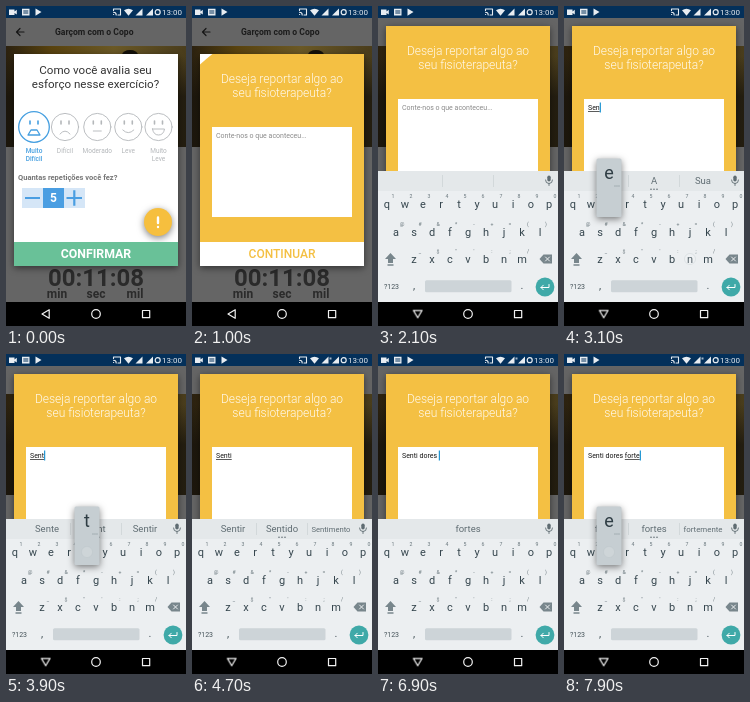
Write an HTML page that moves like this. It is 180x320 px and loops after 8 s.

```html
<!DOCTYPE html>
<html lang="pt-BR">
<head>
<meta charset="utf-8">
<title>Relato de exercício</title>
<style>
  html, body { margin: 0; width: 100%; height: 100%; overflow: hidden; background: #000; }
  svg { display: block; width: 100%; height: 100%; font-family: Roboto, sans-serif; }
  .mid { text-anchor: middle; }
  .bold { font-weight: 700; }
  .line { fill: none; stroke-linecap: round; stroke-linejoin: round; }
  .key { font-size: 11px; fill: #37474f; text-anchor: middle; }
  .hint { font-size: 5.2px; fill: #66747a; text-anchor: middle; }
  .raised { filter: drop-shadow(0 2.5px 3.5px rgba(0, 0, 0, .5)); }
  #typed { font-size: 7px; fill: #151515; white-space: pre; }
  #word { text-decoration: underline; }

  #hole, #report-body, #press, #dialog, #keyboard, #back { animation: 8s linear infinite both; }
  #hole { animation-name: reveal; }
  #report-body { animation-name: appear; }
  #press { animation-name: press; }
  #dialog { animation-name: lift; }
  #keyboard { animation-name: rise; }
  #back { animation-name: turn; transform-origin: 39.7px 308px; }

  @keyframes reveal {
    0%, 7% { r: 0; animation-timing-function: step-end; }
    7.1% { r: 14px; animation-timing-function: cubic-bezier(.4, 0, .7, .8); }
    12.5% { r: 213px; }
    13.5%, 100% { r: 245px; }
  }
  @keyframes appear { 0%, 8.7% { opacity: 0; } 12%, 100% { opacity: 1; } }
  @keyframes press {
    0%, 6.2% { opacity: 0; }
    6.3%, 8% { opacity: .3; }
    9%, 100% { opacity: 0; }
  }
  @keyframes lift {
    0%, 20% { transform: none; animation-timing-function: cubic-bezier(.4, 0, .2, 1); }
    25.5%, 100% { transform: translateY(-28px); }
  }
  @keyframes rise {
    0%, 18% { transform: translateY(131px); animation-timing-function: cubic-bezier(0, 0, .2, 1); }
    23%, 100% { transform: none; }
  }
  @keyframes turn {
    0%, 18% { transform: none; }
    21.5%, 100% { transform: rotate(-90deg); }
  }
</style>
</head>
<body>
<svg viewBox="0 0 180 320" preserveAspectRatio="none">
  <defs>
    <linearGradient id="photo">
      <stop offset="0" stop-color="#2c2210"/>
      <stop offset=".25" stop-color="#59430f"/>
      <stop offset=".6" stop-color="#6b5926"/>
      <stop offset="1" stop-color="#4a3d1c"/>
    </linearGradient>
    <linearGradient id="shade" x2="0" y2="1">
      <stop offset=".1" stop-color="#17130c" stop-opacity="0"/>
      <stop offset=".5" stop-color="#17130c" stop-opacity=".75"/>
    </linearGradient>
    <clipPath id="reveal"><circle id="hole" cx="152" cy="216" r="0"/></clipPath>
  </defs>

  <!-- dimmed screen -->
  <rect width="180" height="320" fill="#656565"/>
  <path class="line" d="M18 26H10.500M14 22.500l-3.500 3.500 3.500 3.500" stroke="#161616" stroke-width="1.200"/>
  <text class="bold" x="49" y="29" font-size="8.600" fill="#1c1c1c">Garçom com o Copo</text>
  <rect y="40" width="180" height="101" fill="url(#photo)"/>
  <rect y="40" width="180" height="101" fill="url(#shade)"/>
  <ellipse cx="124" cy="49" rx="8" ry="5" fill="#14100a"/>
  <g class="mid bold" fill="#2b2b2b">
    <text x="90" y="280" font-size="24">00:11:08</text>
    <g font-size="12">
      <text x="51" y="292">min</text><text x="90" y="292">sec</text><text x="129" y="292">mil</text>
    </g>
  </g>

  <g id="dialog">
    <rect class="raised" x="8" y="48" width="164" height="212" fill="#fff"/>
    <g class="mid" font-size="11.600" fill="#333">
      <text x="89.500" y="68">Como você avalia seu</text>
      <text x="89.500" y="82">esforço nesse exercício?</text>
    </g>
    <g id="faces"></g>
    <text class="bold" x="12" y="174" font-size="7.500" fill="#777">Quantas repetições você fez?</text>
    <rect x="16" y="182" width="63" height="20" fill="#d5e6f7"/>
    <rect x="37" y="182" width="21" height="20" fill="#4a9ee2"/>
    <path d="M19 192h15M60.500 192h15.500M68.300 184.300v15.400" stroke="#4a9ee2" stroke-width="2.200"/>
    <text class="mid bold" x="47.500" y="196.300" font-size="12" fill="#fff">5</text>
    <circle class="raised" cx="152" cy="216" r="14" fill="#f6bf3e"/>
    <circle id="press" cx="152" cy="216" r="14" fill="#fff"/>
    <path class="line" d="M152 211.500v5.500M152 221v.1" stroke="#fff" stroke-width="2.400"/>
    <rect x="8" y="236" width="164" height="24" fill="#69c198"/>
    <text class="mid bold" x="90" y="252.300" font-size="12.300" fill="#fff">CONFIRMAR</text>

    <g clip-path="url(#reveal)">
      <rect x="8" y="48" width="164" height="212" fill="#f4c043"/>
      <g id="report-body">
        <rect x="8" y="236" width="164" height="24" fill="#fff"/>
        <text class="mid" x="90" y="252.300" font-size="12" font-weight="500" fill="#f4c043">CONTINUAR</text>
        <g class="mid" font-size="12" font-weight="300" fill="#fffaf0">
          <text x="90" y="77">Deseja reportar algo ao</text>
          <text x="90" y="91">seu fisioterapeuta?</text>
        </g>
        <rect x="20" y="121" width="140" height="90" fill="#fff"/>
        <text id="prompt" x="24" y="132.300" font-size="7" fill="#8a8a8a">Conte-nos o que aconteceu...</text>
        <text id="typed" x="24" y="132.200"><tspan id="done"></tspan><tspan id="word"></tspan></text>
        <rect id="caret" y="124.500" width="1.200" height="10" fill="#2196d3"/>
      </g>
    </g>
  </g>

  <g id="keyboard">
    <rect y="165" width="180" height="131" fill="#eceff1"/>
    <rect y="165" width="180" height="20" fill="#e4e8ea"/>
    <path id="dividers" d="M64.500 169v12M115.500 169v12" stroke="#cdd3d6" stroke-width=".8"/>
    <g id="suggestions" class="mid" fill="#5f6c72">
      <text x="41" y="178.300"></text><text x="90" y="178.300"></text><text x="139" y="178.300"></text>
    </g>
    <path id="more" class="line" d="M87 183.300h0M90 183.300h0M93 183.300h0" stroke="#55636a" stroke-width="1.500"/>
    <rect x="169.300" y="169.500" width="3.400" height="6" rx="1.700" fill="#5f6c72"/>
    <path class="line" d="M167.500 174a3.500 3.500 0 0 0 7 0M171 177.500v2" stroke="#5f6c72" stroke-width=".9"/>
    <g id="keys"></g>
    <path id="shift" d="M12.500 247l5.500 6h-3v4h-5v-4H7zM9.500 258.300h6v1.400h-6z" fill="#78868c"/>
    <path d="M161.500 253l4-4.500h8.500v9h-8.500z" fill="#78868c"/>
    <path class="line" d="M167.500 251l4 4m0-4l-4 4" stroke="#eceff1"/>
    <g class="mid" fill="#455359">
      <text x="13.500" y="282.700" font-size="7">?123</text>
      <text x="36" y="283" font-size="11">,</text>
      <text x="144" y="283" font-size="11">.</text>
    </g>
    <rect x="47" y="274.300" width="86.500" height="12" rx="1.500" fill="#cdd4d8"/>
    <circle cx="167" cy="281" r="9.400" fill="#3fa9a8"/>
    <path class="line" d="M171 278.500v3h-8m2.300-2.300l-2.300 2.300 2.300 2.300" stroke="#fff"/>
    <g id="popup">
      <rect class="raised" x="-12.500" y="-45.500" width="25" height="58.500" rx="1.500" fill="#c6ced2"/>
      <text class="mid" y="-25" font-size="18" fill="#2f3d44"></text>
      <path class="line" d="M6 -18h0M8 -18h0M10 -18h0" stroke="#66757c" stroke-width=".9"/>
    </g>
    <circle id="touch" r="5.500" fill="#fff" fill-opacity=".15" stroke="#b4bec3" stroke-opacity=".4" stroke-width=".7"/>
  </g>

  <!-- system bars -->
  <rect width="180" height="12" fill="#04305a"/>
  <g fill="#e8edf2">
    <path d="M3 3.500h5.500v2l2.300-1.700v4.800L8.500 7v2H3z"/>
    <path d="M16 2.800h7.500v6.600H16zM17.300 4.500v1h5v-1zM17.300 6.600v1h5v-1z" fill-rule="evenodd"/>
    <path d="M29.500 2.500l6 3.600-6 3.600z"/>
    <path class="line" d="M107.500 4.500V3h7v6h-2.500M107.500 6.300q2.700 0 2.700 2.700M107.500 8.500h.2" stroke="#e8edf2" stroke-width="1.100"/>
    <path d="M118 4.200q4.500-3 9 0l-4.500 5.600z"/>
    <path d="M136.500 2.500v7h-7z"/>
    <path id="signal" d="M137.500 3.500h2v2h-2z" fill-opacity=".7"/>
    <path d="M147 2.500v7h-7z"/>
    <circle cx="151.700" cy="6.200" r="2.500" fill="none" stroke="#e8edf2" stroke-width="1.200"/>
    <text x="156" y="9" font-size="8">13:00</text>
  </g>
  <rect y="296" width="180" height="24" fill="#000"/>
  <g class="line" stroke="#f2f2f2" stroke-width="1.200">
    <path id="back" d="M36 308l7.200-4.300v8.600z"/>
    <circle cx="90" cy="308" r="4.300"/>
    <rect x="136.500" y="304.500" width="7.200" height="7.200"/>
  </g>
</svg>
<script>
const $ = id => document.getElementById(id);
const show = (node, on) => node.setAttribute('visibility', on ? 'inherit' : 'hidden');

const faces = [
  [28, 'Muito Difícil', 'M-6 8l3-5h6l3 5z'],
  [59, 'Difícil', 'M-5 7q5-6 10 0'],
  [91.3, 'Moderado', 'M-4 4h8'],
  [122.3, 'Leve', 'M-5.500 3q5.500 5.500 11 0'],
  [152.5, 'Muito Leve', 'M-6 2h12q-1 6-6 6t-6-6z'],
];
$('faces').innerHTML = faces.map(([x, label, mouth], i) => {
  const color = i ? '#b4b7ba' : '#459fe0';
  const words = label.split(' ').map((word, n) =>
    `<text class="mid" y="${26 + 8 * n}" font-size="6.5" font-weight="${i ? 400 : 500}" fill="${color}">${word}</text>`);
  return `<g transform="translate(${x} 121)">
    <g class="line" stroke="${color}" stroke-width="${i ? 0.9 : 1.3}">
      <circle r="${i ? 13.6 : 15.3}"/><path d="${mouth}"/>
      <path d="M-4 -6v3M4 -6v3" stroke-width="1.600"/>
    </g>${words.join('')}</g>`;
}).join('');

const rows = [
  ['qwertyuiop', '1234567890', 9],
  ['asdfghjkl', '@#&*-+=()', 18],
  ['zxcvbnm', '_$"\':;/', 36],
];
const spots = { ' ': [90, 280], shift: [12.5, 253] };
$('keys').innerHTML = rows.map(([letters, hints, left], row) =>
  [...letters].map((letter, i) => {
    const x = left + 18 * i, y = 198 + 27.5 * row;
    spots[letter] = [x, y];
    return `<text class="key" x="${x}" y="${y + 4}">${letter}</text>
      <text class="hint" x="${x + 6}" y="${y - 6}">${hints[i]}</text>`;
  }).join('')).join('');
const keys = [...document.querySelectorAll('.key')];
const letters = keys.map(key => key.textContent);

// time, character, popup start and end relative to that time
const strokes = [
  [2700, 'S'], [3000, 'e'], [3100, 'n', 100], [3800, 't'], [4200, 'i', -100, 100],
  [4900, ' '], [5300, 'd'], [5600, 'o'], [5800, 'r'], [6000, 'e'], [6200, 's'],
  [6700, ' '], [7200, 'f'], [7400, 'o'], [7600, 'r'], [7700, 't'], [7900, 'e'],
].map(([time, char, from = 0, to = 200]) => ({ time, char, from: time + from, to: time + to }));

const offers = [
  [0, ''], [2500, 'O A Sua'], [3200, 'Sem Sen Sendo'], [3900, 'Sente Sent Sentir'],
  [4300, 'Sentir Sentido Sentimento'], [5000, 'que o a'], [5400, 'de d do'],
  [5700, 'do dos dor'], [5900, 'dor dores dormir'], [6400, 'dores Dores dor'],
  [6800, ' fortes '], [7300, 'foi f fortes'], [7500, 'foi for fortes'],
  [7700, 'forte fortes fortemente'],
];

const setText = (node, text) => { if (node.textContent !== text) node.textContent = text; };
const place = (node, [x, y]) => node.setAttribute('transform', `translate(${x} ${y})`);
const slots = [...$('suggestions').children];

function drawOffers(t) {
  const offer = offers.findLast(([time]) => time <= t)[1];
  const words = offer.split(' ');
  slots.forEach((slot, i) => {
    const word = words[i] || '';
    if (slot.textContent === word) return;
    slot.textContent = word;
    slot.style.fontSize = '9.5px';
    const width = slot.getComputedTextLength();
    if (width > 39) slot.style.fontSize = 9.5 * 39 / width + 'px';
  });
  show($('dividers'), offer !== ' fortes ');
  show($('more'), words[0]);
}

function drawTyping(t) {
  const past = strokes.filter(s => s.time <= t);
  const text = past.map(s => s.char).join('');
  const split = text.lastIndexOf(' ') + 1;
  setText($('done'), text.slice(0, split));
  setText($('word'), text.slice(split));
  show($('prompt'), !text);

  const edited = past.length ? past.at(-1).time : 1500;
  show($('caret'), t >= 1500 && (t - edited) % 1000 < 500);
  $('caret').setAttribute('x', 24 + (text ? $('typed').getComputedTextLength() : 0));
}

function drawKeys(t) {
  const caps = t >= 2500 && t < 2800;
  keys.forEach((key, i) => setText(key, caps ? letters[i].toUpperCase() : letters[i]));
  $('shift').setAttribute('fill', caps ? '#3fa9a8' : '#78868c');

  const popped = strokes.findLast(s => s.char !== ' ' && s.from <= t && t < s.to);
  show($('popup'), popped);
  if (popped) {
    place($('popup'), spots[popped.char.toLowerCase()]);
    setText($('popup').querySelector('text'), popped.char);
  }

  const touched = strokes.findLast(s => s.time <= t && t < s.time + 200);
  const name = touched ? touched.char.toLowerCase() : t >= 2400 && t < 2500 && 'shift';
  show($('touch'), name);
  if (name) place($('touch'), spots[name]);
}

let start;
function frame(now) {
  start ??= now;
  const t = (now - start) % 8000;
  drawOffers(t);
  drawTyping(t);
  drawKeys(t);
  show($('signal'), t >= 4500);
  requestAnimationFrame(frame);
}
requestAnimationFrame(frame);
</script>
</body>
</html>
```
